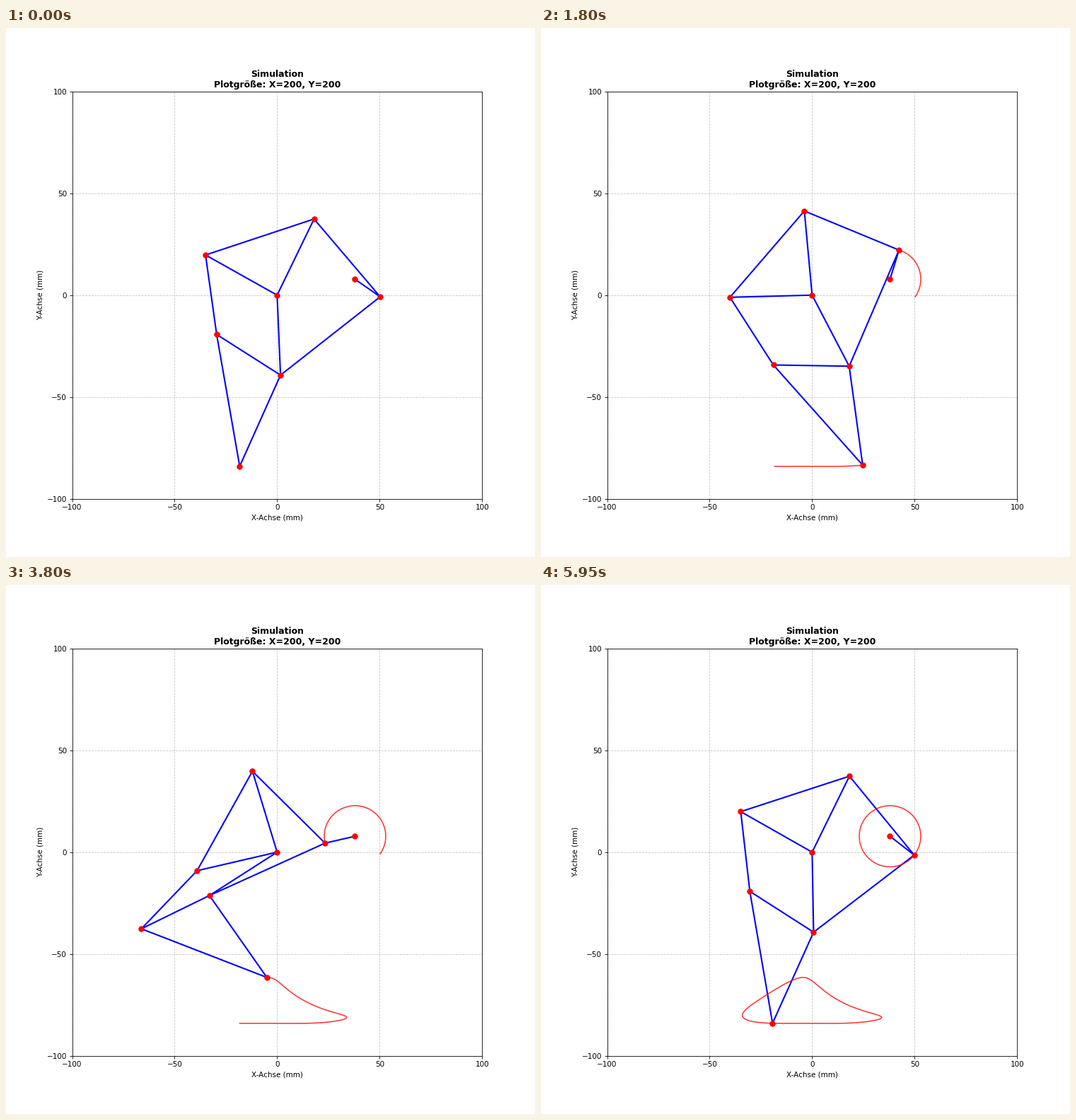
Animation of 748 by 748 pixels, one loop 6 s. Source, as a matplotlib script:

```python
import numpy as np
import matplotlib.pyplot as plt
from matplotlib.animation import FuncAnimation

FRAMES = 120
INTERVAL = 50
START = np.radians(-35)


def join(p, q, rp, rq):
    """Point at distance rp from p and rq from q, left of the way p -> q."""
    d = abs(q - p)
    along = (d**2 + rp**2 - rq**2) / (2 * d)
    across = np.sqrt(rp**2 - along**2)
    return p + (along + 1j * across) * (q - p) / d


# Joints as complex numbers, one value per step of the crank
angle = START + 2 * np.pi * np.arange(FRAMES) / FRAMES
hub = np.full(FRAMES, 38 + 7.8j)
pivot = np.zeros(FRAMES, complex)
crank = hub + 15 * np.exp(1j * angle)
top = join(pivot, crank, 41.5, 50)
left = join(pivot, top, 40.1, 55.8)
knee = join(crank, pivot, 62, 39.3)
heel = join(knee, left, 37, 39.4)
foot = join(knee, heel, 49, 65.7)

joints = [hub, crank, pivot, top, left, knee, heel, foot]
bars = [(hub, crank), (crank, top), (crank, knee), (pivot, top),
        (pivot, left), (pivot, knee), (top, left), (left, heel),
        (knee, heel), (heel, foot), (knee, foot)]

fig, ax = plt.subplots(figsize=(10, 10), dpi=74.8)
ax.set_xlim(-100, 100)
ax.set_ylim(-100, 100)
ax.set_xticks(range(-100, 101, 50))
ax.set_yticks(range(-100, 101, 50))
ax.grid(True, linestyle="--", alpha=0.7)
ax.set_title("Simulation\nPlotgröße: X=200, Y=200", fontweight="bold")
ax.set_xlabel("X-Achse (mm)")
ax.set_ylabel("Y-Achse (mm)")

bar_lines = [ax.plot([], [], "b-", lw=2)[0] for _ in bars]
dots = ax.scatter([], [], s=50, color="red", zorder=3)
trails = [ax.plot([], [], "r-", lw=1.5, alpha=0.8)[0] for _ in range(2)]


def place(line, z):
    line.set_data(z.real, z.imag)


def update(i):
    for line, (a, b) in zip(bar_lines, bars):
        place(line, np.array([a[i], b[i]]))
    dots.set_offsets([(z[i].real, z[i].imag) for z in joints])
    for line, z in zip(trails, (crank, foot)):
        place(line, z[:i + 1])
    return [*bar_lines, dots, *trails]


anim = FuncAnimation(fig, update, frames=FRAMES, interval=INTERVAL,
                     init_func=lambda: update(0), repeat=True,
                     repeat_delay=0, blit=False)
plt.show()
```
